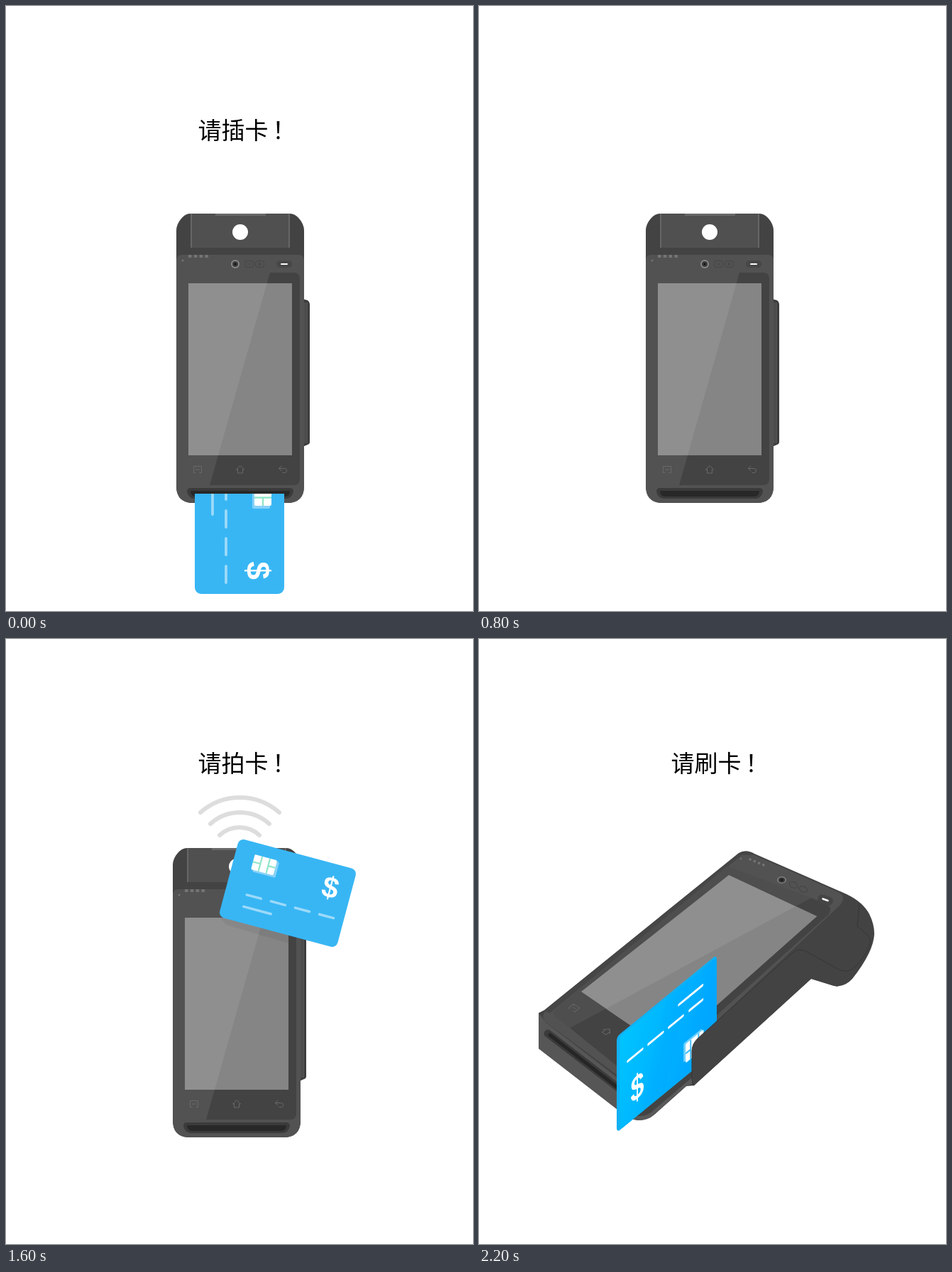
Write an HTML page that moves like this. It is 658 px wide and 851 px high and loops after 2400 ms.

```html
<!DOCTYPE html>
<html lang="zh-CN">
<head>
<meta charset="utf-8">
<style>
  html, body { margin: 0; width: 100%; height: 100%; overflow: hidden; background: #fff; }
  svg { display: block; width: 658px; height: 851px; }
  .caption { font: 33px "Noto Sans CJK SC", "Noto Sans CJK", sans-serif; fill: #000; }
  .mark { font-family: "Noto Sans CJK JP", "Noto Sans CJK", sans-serif; }
  .dollar { font: bold 46px "Liberation Sans", sans-serif; fill: #fff; text-anchor: middle; }
  .line { fill: none; stroke-linecap: round; stroke-linejoin: round; }
</style>
</head>
<body>
<svg viewBox="0 0 658 851" xmlns="http://www.w3.org/2000/svg">
  <defs>
    <clipPath id="belowSlot"><rect x="240" y="686" width="180" height="165"/></clipPath>
    <clipPath id="screenClip"><rect x="252" y="392" width="146" height="242"/></clipPath>
    <linearGradient id="cardShine" x1="0" y1="0" x2="1" y2="0.35">
      <stop offset="0" stop-color="#00c4ff"/>
      <stop offset="1" stop-color="#00a6ff"/>
    </linearGradient>

    <g id="menuIcon" class="line"><path d="M-5.500 4.500V-4.500H5.500V4.500M-2.500 0H2.500M-5.500 4.500H-3M5.500 4.500H3"/></g>
    <g id="homeIcon" class="line"><path d="M-5.500 0L0-5.500L5.500 0H3.500V5H-3.500V0Z"/></g>
    <g id="backIcon" class="line"><path d="M-2-5L-5.500-1.500L-2 2M-5.500-1.500H2.500Q5.500-1.500 5.500 1.500T2.500 4.500H0"/></g>

    <g id="card">
      <rect width="190" height="126" rx="9" fill="#38b6f4"/>
      <rect x="33" y="20" width="37" height="25" rx="2" fill="#86d1f8"/>
      <rect x="30" y="18" width="36" height="24" rx="2" fill="#fff"/>
      <path d="M42 18V42M54.500 18V42M30 30H42M54.500 30H66" stroke="#94e6cb" stroke-width="2.500"/>
      <g class="line" stroke="#9cdaf9" stroke-width="3.800">
        <path d="M34 82H57M73 82H96M112 82H135M151 82H174M34 101H78"/>
      </g>
      <text class="dollar" x="157" y="53">$</text>
    </g>

    <g id="swipeCardArt">
      <rect width="190" height="126" rx="6" fill="#12b0f2"/>
      <rect x="6" y="3" width="184" height="123" rx="6" fill="url(#cardShine)"/>
      <path d="M95 3H140L90 126H45Z" fill="#0090ff" opacity=".08"/>
      <path class="line" d="M21 44H49M60 44H88M99 44H126M138 44H163M118 25H163" stroke="#fff" stroke-width="3.400"/>
      <rect x="127" y="81" width="35" height="25" rx="2" fill="#6fd3ff"/>
      <rect x="131" y="84" width="34" height="25" rx="2" fill="#fff"/>
      <path d="M140.500 84V109M155.500 84V109M131 96.500H140.500M155.500 96.500H165" stroke="#3bbcff" stroke-width="2.500"/>
      <text class="dollar" x="39" y="104">$</text>
    </g>

    <g id="terminal">
      <path d="M418 412L425 414Q428 416 428 419V613Q428 616 425 617L418 620Z" fill="#3d3d3d"/>
      <path d="M420 417H425V615H420Z" fill="#505050"/>
      <path d="M422 417V615" stroke="#444"/>
      <path d="M260 292H400Q407 292 413 299Q420 307 420 316V675Q420 699 396 699H264Q240 699 240 675V316Q240 307 247 299Q253 292 260 292Z" fill="#434343"/>
      <rect x="260" y="292" width="140" height="48" fill="#505050"/>
      <path d="M261 292V340M399 292V340" stroke="#666" stroke-width="2"/>
      <rect x="295" y="292" width="71" height="3" fill="#6a6a6a"/>
      <circle cx="330" cy="318" r="11" fill="#fff"/>
      <path d="M248 350H412Q420 350 420 358V675Q420 699 396 699H264Q240 699 240 675V358Q240 350 248 350Z" fill="#525252"/>
      <path d="M372 375H405Q414 375 414 384V665Q414 674 405 674H287Z" fill="#434343"/>
      <rect x="257" y="390" width="146" height="242" fill="#8f8f8f"/>
      <path d="M367.700 390H403V632H299Z" fill="#858585"/>
      <path d="M257 352H285" stroke="#747474" stroke-width="4" stroke-dasharray="4.500 3.300"/>
      <circle cx="249" cy="358" r="1.500" fill="#747474"/>
      <circle cx="323" cy="363" r="6" fill="#888"/>
      <circle cx="323" cy="363" r="4" fill="#3a3a3a"/>
      <circle cx="323" cy="363" r="1.500" fill="#111"/>
      <g fill="none" stroke="#454545">
        <rect x="336.500" y="358.500" width="12" height="9" rx="3"/>
        <rect x="351.500" y="358.500" width="12" height="9" rx="3"/>
        <path d="M340 363H345M355 363H360M357.500 360.500V365.500"/>
      </g>
      <rect x="381" y="358" width="22" height="10" rx="5" fill="#474747"/>
      <rect x="387" y="362" width="10" height="2" rx="1" fill="#fff"/>
      <g stroke="#686868">
        <use href="#menuIcon" x="270" y="652"/>
        <use href="#homeIcon" x="330" y="652"/>
        <use href="#backIcon" x="390" y="652"/>
      </g>
      <path d="M260 678H400Q405 678 405 683Q403 693 393 693H267Q257 693 255 683Q255 678 260 678Z" fill="#3b3b3b"/>
      <path d="M260 682H400Q400 690 392 690H268Q260 690 260 682Z" fill="#282828"/>
    </g>
  </defs>

  <rect width="658" height="851" fill="#fff"/>

  <g id="insertScene">
    <use href="#terminal"/>
    <g clip-path="url(#belowSlot)"><use id="insertCard" href="#card"/></g>
  </g>

  <g id="tapScene">
    <use id="tapTerminal" href="#terminal"/>
    <g id="tapParts">
      <g class="line" stroke="#ddd" stroke-width="6">
        <path d="M274 244A84 84 0 0 1 385 244"/>
        <path d="M288 260A62 62 0 0 1 371 260"/>
        <path d="M301 276A41 41 0 0 1 357 276"/>
      </g>
      <g clip-path="url(#screenClip)">
        <path d="M300 390L310 402L398 428V390Z" fill="#000" opacity=".06"/>
      </g>
      <use id="tapCard" href="#card"/>
    </g>
  </g>

  <g id="swipeScene">
    <path d="M84 526L92 522L366 301Q376 295 388 302L518 359Q541 370 550 387Q557 401 557 415Q556 440 526 478Q515 490 500 488L468 478L303 628L292 629L247 669Q238 677 225 677Q213 676 203 668L84 576Z" fill="#434343"/>
    <path d="M84 526L95 540L204 624Q213 631 223 632V677Q212 675 203 668L84 576Z" fill="#565656"/>
    <path d="M223 671Q238 672 247 662L300 617V626L292 629L247 669Q238 677 223 677Z" fill="#595959"/>
    <path d="M93 524L366 303Q376 298 388 304L504 355Q519 361 509 374L246 621Q226 634 205 621L97 541Q86 532 93 524Z" fill="#525252"/>
    <path d="M93 524L366 303Q371 299 377 299L388 304L370 304L100 526Z" fill="#464646"/>
    <path d="M468 364L491 374Q499 379 492 388L243 612Q227 626 212 615L128 547Z" fill="#434343"/>
    <path d="M352 320L468 364L128 547L107 531Q102 526 108 521L342 326Q347 319 352 320Z" fill="#4e4e4e"/>
    <path d="M352 332L476 390L264 578L144 496Z" fill="#8f8f8f"/>
    <path d="M446 376L476 390L264 578L179 520Z" fill="#858585"/>
    <path class="line" d="M382 310L401 318" stroke="#747474" stroke-width="3.500" stroke-dasharray=".1 6.700"/>
    <circle cx="369" cy="309" r="1.200" fill="#747474"/>
    <ellipse cx="426.500" cy="339" rx="6.500" ry="5" fill="#7c7c7c"/>
    <ellipse cx="426.500" cy="339" rx="4.500" ry="3.500" fill="#333"/>
    <circle cx="426.500" cy="339" r="1.300" fill="#111"/>
    <g fill="none" stroke="#454545">
      <ellipse cx="443" cy="346" rx="6" ry="4" transform="rotate(22 443 346)"/>
      <ellipse cx="457" cy="352" rx="6" ry="4" transform="rotate(22 457 352)"/>
    </g>
    <rect x="477" y="361" width="22" height="12" rx="6" fill="#454545" transform="rotate(18 488 367)"/>
    <path class="line" d="M484.500 365.500L491.500 368" stroke="#fff" stroke-width="2.600"/>
    <g stroke="#686868">
      <use href="#menuIcon" transform="matrix(.8 .5 -.75 .6 134 519)"/>
      <use href="#homeIcon" transform="matrix(.8 .5 -.75 .6 180 552)"/>
      <use href="#backIcon" transform="matrix(.8 .5 -.75 .6 233 589)"/>
    </g>
    <path class="line" d="M97 555L209 641" stroke="#3b3b3b" stroke-width="11"/>
    <path class="line" d="M100 557L207 640" stroke="#262626" stroke-width="5"/>
    <use id="swipeCard" href="#swipeCardArt"/>
    <path d="M303 628L300 620V580Q300 570 308 562L441 442Q451 433 464 441L505 464L520 470L505 489L468 478Z" fill="#434343"/>
    <path class="line" d="M302 628L300 620V580Q300 570 308 562L441 442Q451 433 464 441L505 464Q520 472 531 460Q546 445 551 428Q553 420 545 414L533 404L536 372" stroke="#363636"/>
  </g>

  <g id="captionGroup" class="caption">
    <text id="caption" x="270.500" y="187"></text>
    <text class="mark" lang="ja" x="367" y="187">！</text>
  </g>
</svg>

<script>
const STEP = 200;
const LOOP = 2400;
const el = id => document.getElementById(id);
const show = (id, on) => el(id).setAttribute("display", on ? "inline" : "none");
const move = (id, transform) => el(id).setAttribute("transform", transform);

const insertBottoms = [827, 813, 780, 764];
const tapPoses = [
  { x: 356.5, y: 356.5, size: 1.08 },
  { x: 397, y: 357.5, size: 1 },
  { x: 397, y: 357.5, size: 0.95 },
  { x: 397, y: 357.5, size: 1 }
];
const swipeTravel = [0, 39 / 145, 1];

function drawInsert(i) {
  move("insertCard", `translate(392 ${insertBottoms[i] - 190}) rotate(90)`);
}

// The terminal stands alone for one step before the card arrives.
function drawTap(i) {
  const active = i > 0;
  move("tapTerminal", `translate(-5 ${active ? 2 : 0})`);
  show("tapParts", active);
  if (!active) return;
  const { x, y, size } = tapPoses[i - 1];
  move("tapCard", `translate(${x} ${y}) rotate(15) scale(${0.905 * size}) translate(-95 -63)`);
}

function drawSwipe(i) {
  const x = 339 - 145 * swipeTravel[i];
  const y = 424.5 + 135 * swipeTravel[i];
  move("swipeCard", `matrix(.742 -.608 0 1.07 ${x} ${y})`);
}

const scenes = [
  { id: "insertScene", from: 0, text: "请插卡", draw: drawInsert },
  { id: "tapScene", from: 4, text: "请拍卡", draw: drawTap },
  { id: "swipeScene", from: 9, text: "请刷卡", draw: drawSwipe }
];

function render(time) {
  const step = Math.floor((time % LOOP) / STEP);
  const current = scenes.filter(s => step >= s.from).pop();
  scenes.forEach(s => show(s.id, s === current));
  current.draw(step - current.from);
  el("caption").textContent = current.text;
  show("captionGroup", step !== 4);
}

const start = performance.now();
function tick() {
  render(performance.now() - start);
  requestAnimationFrame(tick);
}
tick();
</script>
</body>
</html>
```
